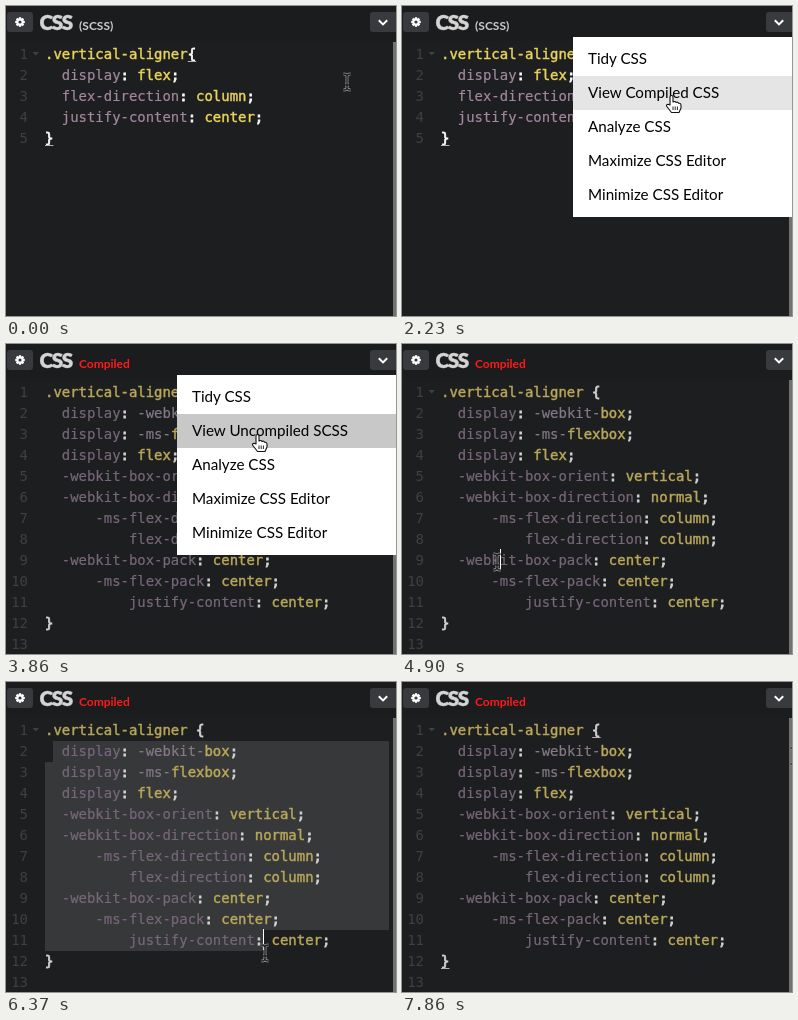
Write an HTML page that moves like this. It is 390x310 px and loops after 8000 ms.

```html
<!DOCTYPE html>
<html lang="en">
<head>
<meta charset="utf-8">
<title>Viewing compiled CSS</title>
<style>
html, body { margin: 0; width: 100%; height: 100%; overflow: hidden; background: #1d1e1f; }
svg { display: block; }
text { white-space: pre; }
.code { font: 13.95px "DejaVu Sans Mono", "Noto Sans Mono", monospace; }
.ui { font-family: Lato, sans-serif; }
.num { fill: #3e4042; text-anchor: end; }
.name, .value, .mark, .prefix { fill: var(--ink); stroke: var(--ink); stroke-width: .2; }
.value { stroke-width: .45; }
.mark { stroke-width: .8; }
.name { --ink: #a3879f; }
.value { --ink: #e8d45c; }
.mark { --ink: #fbfbfb; }
.prefix { --ink: #857a86; }
.dim .name { --ink: #78677b; }
.dim .value { --ink: #b9a75a; }
.dim .mark { --ink: #d2d2d2; }
</style>
</head>
<body>
<svg id="stage" width="390" height="310" viewBox="0 0 390 310"></svg>
<script>
const LOOP = 8000, TICK = LOOP / 54;
const LEFT = 39, CHAR = 8.4, TOP = 37.6, ROW = 21, RIGHT = 383;

const SCSS = `.vertical-aligner{
  display: flex;
  flex-direction: column;
  justify-content: center;
}`.split("\n");

const COMPILED = `.vertical-aligner {
  display: -webkit-box;
  display: -ms-flexbox;
  display: flex;
  -webkit-box-orient: vertical;
  -webkit-box-direction: normal;
      -ms-flex-direction: column;
          flex-direction: column;
  -webkit-box-pack: center;
      -ms-flex-pack: center;
          justify-content: center;
}
`.split("\n");

// Pointer path: tick, x, y
const PATH = [
  [0, 341, 76], [2, 341, 76], [6, 375, 30], [12, 375, 30], [15, 272, 98],
  [16, 272, 98], [17, 273, 98], [18, 273, 98], [20, 172, 99], [22, 254, 99],
  [28, 254, 99], [33, 95, 218], [35, 95, 218], [38, 47, 71], [43, 259, 271],
  [44, 60, 281], [47, 60, 281], [50, 340, 85], [51, 340, 85], [53, 392, 74]
];

const stage = document.getElementById("stage");
const rowTop = row => TOP + row * ROW;
const colX = col => LEFT + col * CHAR;
const during = (t, from, to) => t >= from && t < to;

function add(parent, tag, attrs = {}, text) {
  const node = document.createElementNS("http://www.w3.org/2000/svg", tag);
  for (const key in attrs) node.setAttribute(key, attrs[key]);
  if (text !== undefined) node.textContent = text;
  parent.append(node);
  return node;
}
const rect = (parent, x, y, width, height, fill, rx = 0) =>
  add(parent, "rect", { x, y, width, height, fill, rx });
const show = (node, on) => node.setAttribute("display", on ? "inline" : "none");

function tokens(line) {
  const rule = line.match(/^(\s*[\w-]+)(: )(-\w+-)?(\w+)(;)$/);
  if (rule) {
    return ["name", "mark", "prefix", "value", "mark"].map((kind, i) => [kind, rule[i + 1] || ""]);
  }
  return [["value", line.replace(/[{}]/, "")], ["mark", (line.match(/[{}]/) || [""])[0]]];
}

function codeView(lines, kind) {
  const group = add(stage, "g", { class: "code " + kind });
  lines.forEach((line, row) => {
    const y = rowTop(row) + 15;
    add(group, "text", { x: 22, y, class: "num" }, row + 1);
    const text = add(group, "text", { x: LEFT, y });
    for (const [name, part] of tokens(line)) add(text, "tspan", { class: name }, part);
  });
  return group;
}

function underlines(lines) {
  const group = add(stage, "g");
  lines.forEach((line, row) => {
    const col = line.search(/[{}]/);
    if (col >= 0) rect(group, colX(col), Math.floor(rowTop(row)) + 18, CHAR, 1, "#b4b4b4");
  });
  return group;
}

// Editor
rect(stage, 0, 0, 390, 310, "#1d1e1f");
const selection = [0, 1, 2].map(() => rect(stage, 0, 0, 0, 0, "#37383a"));
const plainView = codeView(SCSS, "");
const compiledView = codeView(COMPILED, "dim");
const plainMatch = underlines(SCSS);
const compiledMatch = underlines(COMPILED);
const fold = add(stage, "path", { d: "M26.5 46H33L29.8 49.5Z", fill: "#3e4042" });
const caret = rect(stage, 0, 0, 1, 21, "#fff");
rect(stage, 387, 36, 3, 274, "#727273");

// Header
rect(stage, 0, 0, 390, 35, "#1b1c1e");
rect(stage, 1, 6, 26, 20, "#393a3e", 3);
const gear = add(stage, "g", { transform: "translate(14 16)", fill: "#fff" });
for (let i = 0; i < 4; i++) {
  add(gear, "rect", { x: -1.1, y: -4.8, width: 2.2, height: 9.6, transform: `rotate(${i * 45})` });
}
add(gear, "circle", { r: 3.7 });
add(gear, "circle", { r: 1.6, fill: "#393a3e" });
const toggle = rect(stage, 364, 6, 30, 20, "#393a3e", 3);
add(stage, "path", { d: "M372.8 14.2L377 18.4L381.2 14.2", fill: "none", stroke: "#fff", "stroke-width": 2 });
add(stage, "text", {
  x: 33.5, y: 23.5, class: "ui", fill: "#d4d4d4", stroke: "#d4d4d4", "stroke-width": .4,
  "font-size": 20.6, "font-weight": 900, "letter-spacing": -1.3
}, "CSS");
const badge = add(stage, "text", { x: 73, y: 23.5, class: "ui", "font-size": 12, "font-weight": 700 });

// Menu
const menu = add(stage, "g", { class: "ui", "font-size": 15.2 });
rect(menu, 171, 31, 219, 180, "#fff");
const highlight = rect(menu, 171, 70, 219, 34, "#e5e5e5");
const items = ["Tidy CSS", "", "Analyze CSS", "Maximize CSS Editor", "Minimize CSS Editor"]
  .map((label, i) => add(menu, "text", { x: 186, y: 57.7 + i * 34, fill: "#000" }, label));

// Pointers
const hand = add(stage, "g");
add(hand, "path", {
  d: "M-4 1V-7Q-4 -8.5 -2.5 -8.5T-1 -7V-2Q1.3 -3.3 2 -1.5Q4 -2.5 4.6 -.7Q7 -1 7 1.5V4L5 8.5H-2.5L-7.5 2Q-7.5 .2 -6 .3Z",
  fill: "#fff", stroke: "#111", "stroke-width": 1.1, "stroke-linejoin": "round"
});
add(hand, "path", { d: "M-1 2.5V6M1.2 2.5V6M3.4 2.5V6", stroke: "#111", "stroke-width": .9 });
const beam = add(stage, "g", { fill: "none" });
for (const [stroke, width] of [["#999", 2.8], ["#1b1b1b", 1.3]]) {
  add(beam, "path", {
    d: "M-3.5 -8Q0 -8 0 -5.5V5.5Q0 8 -3.5 8M3.5 -8Q0 -8 0 -5.5M0 5.5Q0 8 3.5 8M-2 3H2",
    stroke, "stroke-width": width
  });
}

function pointerAt(tick) {
  let i = PATH.findIndex(key => key[0] >= tick);
  if (i < 0) i = PATH.length - 1;
  if (i === 0) return PATH[0].slice(1);
  const [t0, x0, y0] = PATH[i - 1], [t1, x1, y1] = PATH[i];
  const p = Math.min(1, (tick - t0) / (t1 - t0)), ease = p * p * (3 - 2 * p);
  return [x0 + (x1 - x0) * ease, y0 + (y1 - y0) * ease];
}

function textPosition([x, y]) {
  const row = Math.max(1, Math.min(11, Math.floor((y - 8 - TOP) / ROW)));
  const col = Math.max(0, Math.min(COMPILED[row].length, Math.round((x - LEFT) / CHAR)));
  return [row, col];
}

function place(node, x0, x1, row0, row1) {
  node.setAttribute("x", Math.round(x0));
  node.setAttribute("y", Math.round(rowTop(row0)));
  node.setAttribute("width", Math.max(0, Math.round(x1) - Math.round(x0)));
  node.setAttribute("height", Math.max(0, (row1 - row0) * ROW));
}

function select(row, col) {
  const [first, middle, last] = selection, single = row === 1;
  place(first, colX(1), single ? colX(col) : RIGHT, 1, 2);
  place(middle, LEFT, RIGHT, 2, row);
  place(last, LEFT, single ? LEFT : colX(col), row, row + 1);
}

function caretAt(tick, head) {
  if (during(tick, 6, 10)) return [4, 1];
  if (during(tick, 33, 37)) return [8, 7];
  if (during(tick, 38, 44)) return head;
  if (during(tick, 48, 52)) return [11, 1];
  return null;
}

function draw(time) {
  const tick = Math.floor((time % LOOP + 3) / TICK);
  const compiled = tick >= 26;
  const pointer = pointerAt(tick);
  const head = textPosition(pointer);

  show(plainView, !compiled);
  show(plainMatch, !compiled);
  show(compiledView, compiled);
  show(compiledMatch, tick >= 48);
  show(fold, !during(tick, 26, 29));
  badge.textContent = compiled ? "Compiled" : "(SCSS)";
  badge.setAttribute("fill", compiled ? "#ff1a1a" : "#cccccc");
  toggle.setAttribute("fill", during(tick, 6, 14) ? "#55585d" : "#393a3e");

  const selecting = during(tick, 38, 47);
  selection.forEach(node => show(node, selecting));
  if (selecting) select(...head);

  const spot = caretAt(tick, head);
  show(caret, spot);
  if (spot) {
    caret.setAttribute("x", Math.round(colX(spot[1])));
    caret.setAttribute("y", Math.floor(rowTop(spot[0])));
  }

  const opacity = Math.min(1, (tick - 12) / 2, (31 - tick) / 2);
  show(menu, opacity > 0);
  menu.setAttribute("opacity", Math.max(0, opacity));
  items[1].textContent = compiled ? "View Uncompiled SCSS" : "View Compiled CSS";
  show(highlight, during(tick, 15, 30));
  highlight.setAttribute("fill", tick >= 19 ? "#c8c8c8" : "#e5e5e5");

  const pointing = during(tick, 6, 30);
  show(hand, pointing);
  show(beam, !pointing);
  (pointing ? hand : beam).setAttribute("transform", `translate(${pointer.map(Math.round).join(" ")})`);
}

const start = performance.now();
function frame() {
  draw(performance.now() - start);
  requestAnimationFrame(frame);
}
frame();
</script>
</body>
</html>
```
